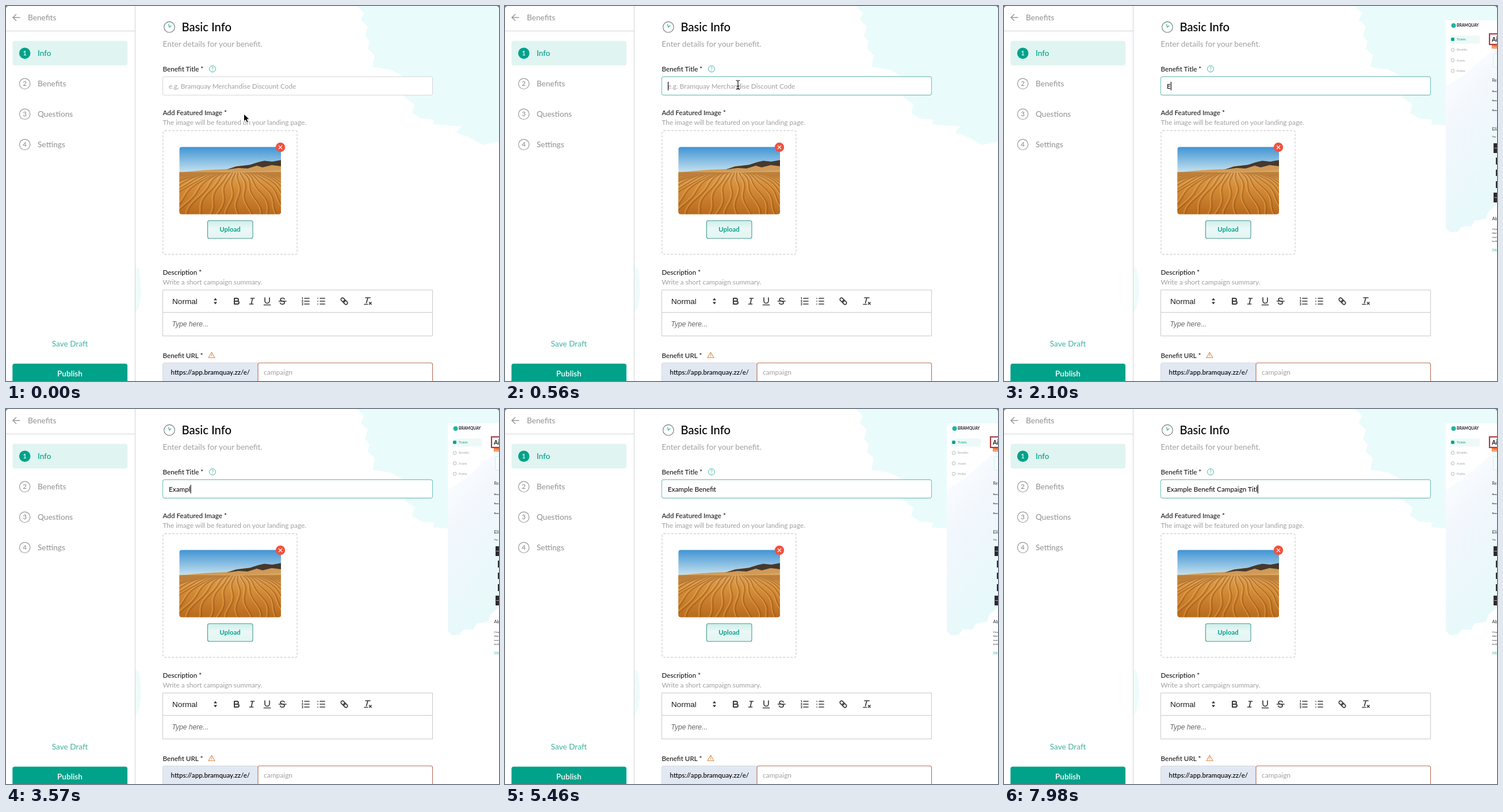
An HTML page for the animation above (8000 ms loop, 857 by 653 pixels).

```html
<!DOCTYPE html>
<html lang="en">
<head>
<meta charset="utf-8">
<title>Benefit form</title>
<style>
  html, body { margin: 0; width: 100%; height: 100%; overflow: hidden; background: #fff; }
  svg { display: block; width: 100%; height: 100%; }
  text { font: 11.8px Lato, "Open Sans", sans-serif; fill: #1c1c1c; white-space: pre; }
  .nav { font-size: 13.6px; font-weight: 500; fill: #999; }
  .num { font-size: 11.5px; font-weight: 500; fill: #8c8c8c; text-anchor: middle; }
  .label { font-size: 11.7px; font-weight: 500; }
  .hint { fill: #a0a0a0; }
  .mid { text-anchor: middle; }
  .teal { fill: #00a28a; }
  .field { font-size: 11.75px; }
  .quill { font-family: "Liberation Sans", Arial, sans-serif; }
  .line { fill: none; stroke: #d4d4d4; }
  .icons { fill: none; stroke: #3c3c3c; stroke-width: 1.7; stroke-linecap: round; stroke-linejoin: round; }
  .tiny text { font-size: 4.6px; }
  .tiny .menu { font-size: 5.1px; }
</style>
</head>
<body>
<svg viewBox="0 0 857 653">
  <defs>
    <linearGradient id="panelWash" x1="0" y1="0" x2=".3" y2="1">
      <stop offset="0" stop-color="#fff"/><stop offset=".45" stop-color="#f2f7fd"/><stop offset="1" stop-color="#e7f9fa"/>
    </linearGradient>
    <linearGradient id="sky" x2="0" y2="1">
      <stop offset="0" stop-color="#3f93d4"/><stop offset="1" stop-color="#cde6f0"/>
    </linearGradient>
    <linearGradient id="sand" x2="0" y2="1">
      <stop offset="0" stop-color="#d9a561"/><stop offset=".35" stop-color="#d68f3a"/><stop offset="1" stop-color="#b86a1c"/>
    </linearGradient>
    <linearGradient id="button" x2="0" y2="1">
      <stop offset="0" stop-color="#cfeeea"/><stop offset=".45" stop-color="#eaf8f6"/><stop offset="1" stop-color="#e2f5f2"/>
    </linearGradient>
    <clipPath id="photo"><rect x="301.5" y="245.5" width="176.5" height="117" rx="4"/></clipPath>
  </defs>

  <path fill="#eafbfc" d="M610 0L622 12 617 24 629 36 624 52 632 62 629 74 641 86 637 106 668 111 688 121 684 132 699 146 692 158 710 172 706 186 722 196 745 198 742 206 792 210 782 220 804 228 830 242 857 236V0Z"/>
  <path fill="#eefbfb" d="M225 453L231 458 234 478 235 502 231 524 225 536Z"/>

  <!-- sidebar -->
  <path class="line" stroke="#e2e2e2" d="M224.5 0V653M0 43.5H224"/>
  <path fill="none" stroke="#999" stroke-width="1.5" d="M24.5 20H12.5M18 14.2L12 20 18 25.8"/>
  <text class="nav" x="38" y="24.7">Benefits</text>
  <rect x="11.5" y="60.7" width="199.7" height="42.8" rx="4" fill="#e0f4f1"/>
  <g id="steps"></g>
  <text class="nav mid" x="111" y="592.5" style="fill:#4db9a8">Save Draft</text>
  <rect x="11.3" y="622.7" width="199.8" height="40" rx="4" fill="#00a28a"/>
  <text class="nav mid" x="111" y="645" style="font-weight:600;fill:#fff">Publish</text>

  <!-- heading -->
  <circle cx="284" cy="36.7" r="9.3" fill="#fff" stroke="#6f7a7d" stroke-width="1.1"/>
  <path fill="none" stroke="#18ad95" stroke-width="1.1" d="M282.5 31.5L284 37 287.3 34"/>
  <text x="305.5" y="43.6" style="font-size:20.2px;font-weight:500;fill:#000">Basic Info</text>
  <text class="hint" x="272.5" y="71" style="font-size:13.6px">Enter details for your benefit.</text>

  <!-- title field -->
  <text class="label" x="272.5" y="114">Benefit Title *</text>
  <circle cx="359" cy="109.5" r="5.5" fill="none" stroke="#3fb5a5"/>
  <text class="mid" x="359" y="112.8" style="font-size:9px;fill:#3fb5a5">?</text>
  <rect x="272.5" y="123" width="469" height="32.2" rx="3" fill="#fff" stroke="#d4d4d4"/>
  <rect id="focus" x="272.5" y="123" width="469" height="32.2" rx="3" fill="none" stroke="#68c0b7"/>
  <text id="example" class="field hint" x="283" y="143.5">e.g. Bramquay Merchandise Discount Code</text>
  <text id="typed" class="field" x="283" y="143.5" style="fill:#000"></text>
  <rect id="caret" y="132" width="1.2" height="15" fill="#111"/>

  <!-- featured image -->
  <text class="label" x="272.5" y="190">Add Featured Image *</text>
  <text class="hint" x="272.5" y="207">The image will be featured on your landing page.</text>
  <rect class="line" x="273" y="217" width="233" height="215.5" rx="3" stroke-width="1.4" stroke-dasharray="4 2.5"/>
  <g clip-path="url(#photo)">
    <rect x="301" y="245" width="178" height="47" fill="url(#sky)"/>
    <path fill="#d09a58" d="M301 290Q345 285 385 284L400 279 430 276 479 275V363H301Z"/>
    <path fill="#46382c" d="M383 285L400 279.5 424 276.5 438 272 449 269.5 463 271 479 268V279L462 277 446 281 436 278 420 283 404 282Z"/>
    <path fill="url(#sand)" d="M301 291Q350 287 390 288T479 285V363H301Z"/>
    <g fill="none" stroke-opacity=".45">
      <path id="crests" stroke="#f0b661" stroke-width="1.6" transform="translate(-3 -1)"/>
      <path id="ripples" stroke="#8f4d14" stroke-width="2"/>
    </g>
  </g>
  <circle cx="477" cy="246" r="8.2" fill="#f2513e"/>
  <path stroke="#fff" stroke-width="1.1" d="M474 243L480 249M480 243L474 249"/>
  <rect x="350.5" y="373.7" width="78.5" height="31" rx="3" fill="url(#button)" stroke="#4a9993" stroke-width="1.1"/>
  <text class="mid teal" x="389.5" y="393.3" style="font-size:11.4px;font-weight:700">Upload</text>

  <!-- description -->
  <text class="label" x="272.5" y="468">Description *</text>
  <text class="hint" x="272.5" y="485">Write a short campaign summary.</text>
  <path fill="#fff" stroke="#c9c9c9" d="M272.5 494.5H741.5V574.5H272.5ZM272.5 533.5H741.5"/>
  <text class="quill" x="289" y="518.7" style="font-size:13.6px">Normal</text>
  <text class="quill" x="288.5" y="558" style="font-size:12.1px;font-style:italic;fill:#666">Type here...</text>
  <path fill="#333" d="M361 512.5L364 508.5 367 512.5ZM361 515.5L364 519.5 367 515.5Z"/>
  <g class="icons" transform="translate(0 505)">
    <path transform="translate(392)" stroke-width="2" d="M5 4H9.5A2.5 2.5 0 0 1 9.5 9H5ZM5 9H10.5A2.5 2.5 0 0 1 10.5 14H5Z"/>
    <path transform="translate(418.5)" d="M7 4H13M5 14H11M8 14L10 4"/>
    <path transform="translate(445)" d="M5 3V8.5A4 4 0 0 0 13 8.5V3M3.5 15.5H14.5"/>
    <path transform="translate(471.5)" d="M12.5 5.5Q12 3.5 9 3.5T5.5 6Q5.5 8 9 8.8T12.7 11.5Q12.5 14.3 9 14.3T5.2 12M3 9H15.5"/>
    <path transform="translate(512)" d="M7 4H15M7 9H15M7 14H15"/>
    <path transform="translate(512)" stroke-width="1" d="M2.5 3L3.5 2.5V5.5M2.5 7.5H4.3L2.5 10.3H4.5M2.5 12.5H4.3L3.5 14 4.3 15.5H2.5"/>
    <path transform="translate(539)" d="M7 4H15M7 9H15M7 14H15M3 4H3.2M3 9H3.2M3 14H3.2"/>
    <g transform="translate(588 9) rotate(45)">
      <rect x="-7" y="-2.7" width="8" height="5.4" rx="2.7"/>
      <rect x="-1" y="-2.7" width="8" height="5.4" rx="2.7"/>
    </g>
    <path transform="translate(620)" d="M5 3H13M6.5 12L9 3M11.5 11L15 14.5M15 11L11.5 14.5M3 14.5H8.5"/>
  </g>

  <!-- address field -->
  <text class="label" x="272.5" y="612.5">Benefit URL *</text>
  <path fill="none" stroke="#dc8b4d" stroke-width="1.1" stroke-linejoin="round" d="M357.5 603L363 612.5H352ZM357.5 606.5V609.5M357.5 610.5V611.3"/>
  <rect x="272.5" y="621.5" width="166" height="40" rx="3" fill="#e2e8f2" stroke="#d3d8e2"/>
  <rect x="438" y="621.5" width="303.5" height="40" rx="3" fill="#fff" stroke="#b9745f" stroke-width="1.2"/>
  <text x="286.5" y="642" style="font-size:11.6px;font-weight:500;fill:#000">https://app.bramquay.zz/e/</text>
  <text class="hint" x="448" y="642" style="font-size:12px">campaign</text>

  <!-- preview -->
  <g id="preview" class="tiny">
    <rect x="768" y="25" width="89" height="404" fill="#fff"/>
    <path fill="url(#panelWash)" d="M768 140L800 120 857 70V345L842 358 838 370 818 374 812 384 796 384 788 393 775 394 768 386Z"/>
    <circle cx="781.5" cy="34" r="4" fill="#20b5a0"/>
    <text x="787" y="36.3" style="font-size:6.7px;font-weight:700;fill:#223">BRAMQUAY</text>
    <rect x="775" y="51.5" width="52" height="14" rx="1.5" fill="#edf9f7"/>
    <g id="menu"></g>
    <rect x="844" y="48.5" width="30" height="18.5" fill="#fff" stroke="#a83a42" stroke-width="2.2"/>
    <text x="848" y="61.5" style="font-size:10.5px;font-weight:700">Ai</text>
    <rect x="848" y="68" width="9" height="6" fill="#ef7a3c"/>
    <text x="849" y="72.7" style="fill:#fff">Soo</text>
    <rect x="850.5" y="82.5" width="20" height="24" rx="2" fill="#f4fcfc" stroke="#d5ecec"/>
    <g id="body"></g>
    <path fill="#2b2b2e" d="M851 239H857V256H851ZM851 325H857V342H851ZM855 264H857V276H855ZM855 285H857V296H855ZM855 305H857V317H855Z"/>
    <path stroke="#aaa" d="M852 247.5H857M852 333.5H857"/>
    <path stroke="#37b5a5" stroke-width=".6" d="M848 426.3H857"/>
  </g>

  <path id="beam" fill="none" stroke="#111" stroke-width="1.2" d="M-3.5 -7.5Q0 -7.5 0 -5.5Q0 -7.5 3.5 -7.5M0 -6V7M-3.5 8Q0 8 0 6Q0 8 3.5 8M-2 2.5H2"/>
  <path id="arrow" stroke="#fff" stroke-width=".9" d="M0 0V13L3 10.3 5.2 15 7.6 14 5.5 9.3H9.5Z"/>

  <path fill="#666" d="M0 0H5Q0 0 0 5ZM857 0H852Q857 0 857 5Z"/>
</svg>
<script>
const $ = id => document.getElementById(id);
const show = (id, on) => $(id).setAttribute('visibility', on ? 'visible' : 'hidden');
const clamp = v => Math.min(1, Math.max(0, v));

$('steps').innerHTML = ['Info', 'Benefits', 'Questions', 'Settings'].map((name, i) => {
  const y = 82.3 + 53 * i;
  const [disc, ring, digit, label] = i
    ? ['none', '#999', '#8c8c8c', '#999']
    : ['#00a28a', '#00a28a', '#fff', '#00a28a'];
  return `<circle cx="32.7" cy="${y}" r="9.2" fill="${disc}" stroke="${ring}" stroke-width="1.2"/>
    <text class="num" x="32.7" y="${y + 4}" style="fill:${digit}">${i + 1}</text>
    <text class="nav" x="55" y="${y + 4.7}" style="fill:${label}">${name}</text>`;
}).join('');

$('menu').innerHTML = ['Tickets', 'Benefits', 'Assets', 'Profile'].map((name, i) => {
  const y = 58 + 18.3 * i, color = i ? '#a3a9ac' : '#00a28a';
  return `<rect x="777.5" y="${y - 2.5}" width="5" height="5" rx="1" fill="${i ? 'none' : color}" stroke="${color}" stroke-width=".8"/>
    <text class="menu" x="787" y="${y + 1.9}" style="fill:${color}">${name}</text>`;
}).join('');

$('body').innerHTML = [
  ['Re', 132, 7], ['Rewa', 149.5, 4, 700], ['Rewa', 166, 4, 700], ['Rewa', 182.5, 4, 700],
  ['Eli', 216.5, 8], ['You', 229, 4.2], ['Ab', 372.5, 7.5],
  ['Clea', 389.5, 4.5], ['Wel', 396.7, 4.5], ['room', 404, 4.5], ['built', 411.2, 4.5],
  ['http', 425, 4.5, 400, '#37b5a5']
].map(([s, y, size, weight = 400, color = '#333']) =>
  `<text x="848.5" y="${y}" style="font-size:${size}px;font-weight:${weight};fill:${color}">${s}</text>`).join('');

// sand ripples fan out from the horizon, each with a lit crest
let ripples = '';
for (let k = -26; k < 27; k++) {
  for (let i = 0; i <= 14; i++) {
    const s = i / 14;
    const x = 395 + k * (4 + 14 * s) - 25 * s + Math.sin(s * 10 + k * 1.3) * 6 * s;
    ripples += `${i ? 'L' : 'M'}${x.toFixed(1)} ${(290 + 76 * s ** 1.6).toFixed(1)}`;
  }
}
for (const id of ['ripples', 'crests']) $(id).setAttribute('d', ripples);

// bursts of typing: first key, last key, number of keys
const TEXT = 'Example Benefit Campaign Titl', TICK = 70;
const keys = [
  [2100, 2100, 1], [2590, 2660, 2], [3010, 3220, 2], [3570, 4550, 9], [4620, 4620, 1],
  [4900, 4900, 1], [6020, 6020, 1], [6440, 6930, 5], [7280, 7980, 7]
].flatMap(([from, to, n]) => Array.from({ length: n }, (_, i) =>
  Math.round((from + (to - from) * i / Math.max(1, n - 1)) / TICK) * TICK));

function draw(t) {
  const typed = TEXT.slice(0, keys.filter(k => k <= t).length);
  $('typed').textContent = typed;
  const width = typed ? $('typed').getComputedTextLength() : 0;
  $('caret').setAttribute('x', 283 + width);
  show('caret', t >= 560 && !(t >= 1260 && t < 1750) && !(t >= 5460 && t < 6020));
  show('example', !typed);
  show('preview', t >= 630);
  $('focus').setAttribute('opacity', clamp((t - 420) / 140));

  const step = clamp(Math.floor(t / TICK) * TICK / 490);
  const p = step * step * (3 - 2 * step);
  const x = 413.5 - 8.5 * p, y = 188 - 51 * p, inField = y < 156;
  for (const id of ['arrow', 'beam']) $(id).setAttribute('transform', `translate(${x} ${y})`);
  show('arrow', !inField);
  show('beam', inField && t < 2100);
}

let start;
function frame(now) {
  start ??= now;
  draw((now - start) % 8000);
  requestAnimationFrame(frame);
}
draw(0);
requestAnimationFrame(frame);
</script>
</body>
</html>
```
